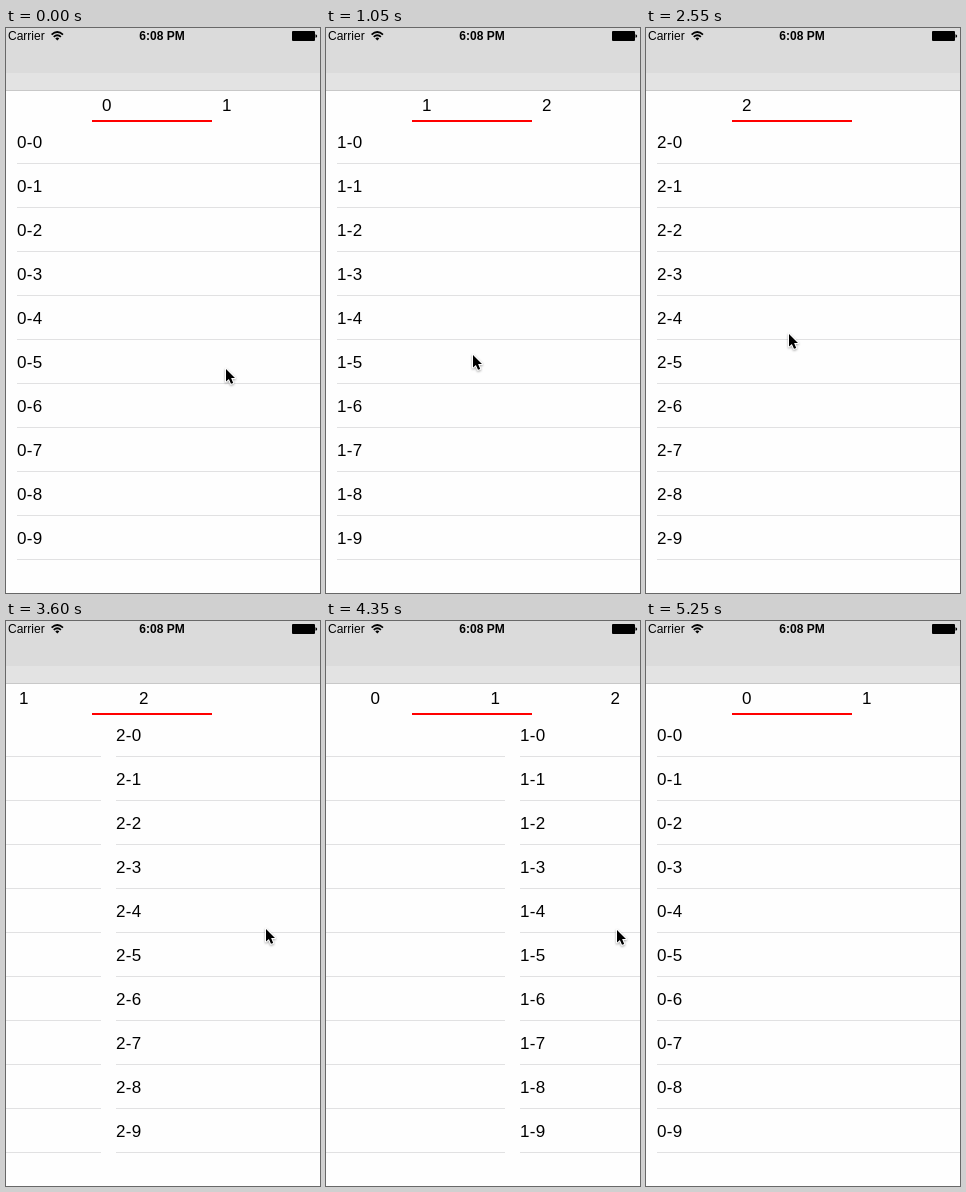
An HTML page for the animation above (5850 ms loop, 314 px wide and 565 px high).

```html
<!DOCTYPE html>
<html lang="en">
<head>
<meta charset="utf-8">
<title>Paged lists</title>
<style>
  html, body { margin: 0; width: 100%; height: 100%; overflow: hidden; background: #fefefe; }
  svg { display: block; width: 314px; height: 565px; }
  text { font: 17px "Liberation Sans", Arial, sans-serif; fill: #000; }
  #pages text { letter-spacing: .02em; }
  .status text { font-size: 12px; }
  .status .time { font-weight: bold; text-anchor: middle; }
  #cursor { filter: drop-shadow(0 1px 1px rgba(0, 0, 0, .35)); }
</style>
</head>
<body>
<svg viewBox="0 0 314 565">
  <rect width="314" height="565" fill="#fefefe"/>
  <g id="pages"></g>
  <g id="tabs"></g>
  <rect x="86" y="92" width="120" height="2" fill="#f00"/>

  <g class="status">
    <rect width="314" height="45" fill="#dbdbdb"/>
    <rect y="45" width="314" height="17" fill="#e3e3e3"/>
    <rect y="62" width="314" height="1" fill="#c8c8c8"/>
    <text x="2" y="12">Carrier</text>
    <g fill="none" stroke="#000" stroke-width="1.7">
      <path d="M45.6 6.6Q51.3 1.4 57 6.6"/>
      <path d="M47.7 8.9Q51.3 5.6 54.9 8.9"/>
    </g>
    <path d="M49.3 10.4Q51.3 8.8 53.3 10.4L51.3 12.6Z"/>
    <text class="time" x="156" y="12">6:08 PM</text>
    <rect x="286" y="3" width="23" height="10" rx="1"/>
    <path d="M309.5 6.2Q311.2 6.6 311.2 8T309.5 9.8Z"/>
  </g>

  <g id="cursor">
    <path d="M0 0V12.6L2.9 9.9L5 14.8L7.2 13.9L5.1 9H9Z"
          stroke="#fff" stroke-width="2" stroke-linejoin="round" paint-order="stroke"/>
  </g>
</svg>
<script>
  const LOOP = 5850, STEP = 150;
  const PAGE = 320, TAB = 120, LEFT = -4, INSET = 15, ROW = 44;
  const SETTLE = 0.1455;  // share of the remaining way left after each step
  const DRIFT_STEPS = 6;

  // A swipe first shows partly dragged with the pointer at "grab";
  // then the page snaps into place while the pointer drifts off.
  const swipes = [
    { step: 4, dir: 1, drag: 107, grab: [100, 330], drift: [188, -12] },
    { step: 10, dir: 1, drag: 134, grab: [80, 313], drift: [63, -7] },
    { step: 24, dir: -1, drag: 99, grab: [260, 308], drift: [-360, 4] },
    { step: 29, dir: -1, drag: 183, grab: [291, 309], drift: [16, 315] }
  ];
  const start = { step: 0, grab: [220, 341], drift: [0, 0] };

  const [pages, tabs, cursor] = ['pages', 'tabs', 'cursor'].map(id => document.getElementById(id));

  function add(parent, name, attrs, label = '') {
    const node = document.createElementNS('http://www.w3.org/2000/svg', name);
    for (const key in attrs) node.setAttribute(key, attrs[key]);
    node.textContent = label;
    parent.append(node);
  }

  for (let page = 0; page < 3; page++) {
    const x = LEFT + page * PAGE + INSET;
    add(tabs, 'text', { x: 96 + page * TAB, y: 83 }, page);
    for (let row = 0; row < 10; row++) {
      add(pages, 'text', { x, y: 120 + row * ROW }, `${page}-${row}`);
      add(pages, 'rect', { x, y: 135 + row * ROW, width: PAGE - INSET, height: 1, fill: '#e1e1e2' });
    }
  }

  function scrollAfter(done, step) {
    return done.reduce((sum, s) => {
      const rest = Math.floor((PAGE - s.drag) * SETTLE ** (step - s.step));
      return sum + s.dir * (PAGE - rest);
    }, 0);
  }

  function pointerAfter({ step: from, grab, drift }, step) {
    const k = Math.min(1, (step - from) / DRIFT_STEPS) ** 2;
    return grab.map((value, axis) => Math.round(value + drift[axis] * k));
  }

  const move = (node, x, y = 0) => node.setAttribute('transform', `translate(${x} ${y})`);

  function draw(time) {
    const step = Math.floor(((time + 0.5) % LOOP) / STEP);
    const done = swipes.filter(s => step >= s.step);
    const scroll = scrollAfter(done, step);
    move(pages, -scroll);
    move(tabs, -Math.round(scroll * TAB / PAGE * 2) / 2);
    move(cursor, ...pointerAfter(done.at(-1) || start, step));
  }

  function tick(now) {
    draw(now);
    requestAnimationFrame(tick);
  }
  draw(0);
  requestAnimationFrame(tick);
</script>
</body>
</html>
```
